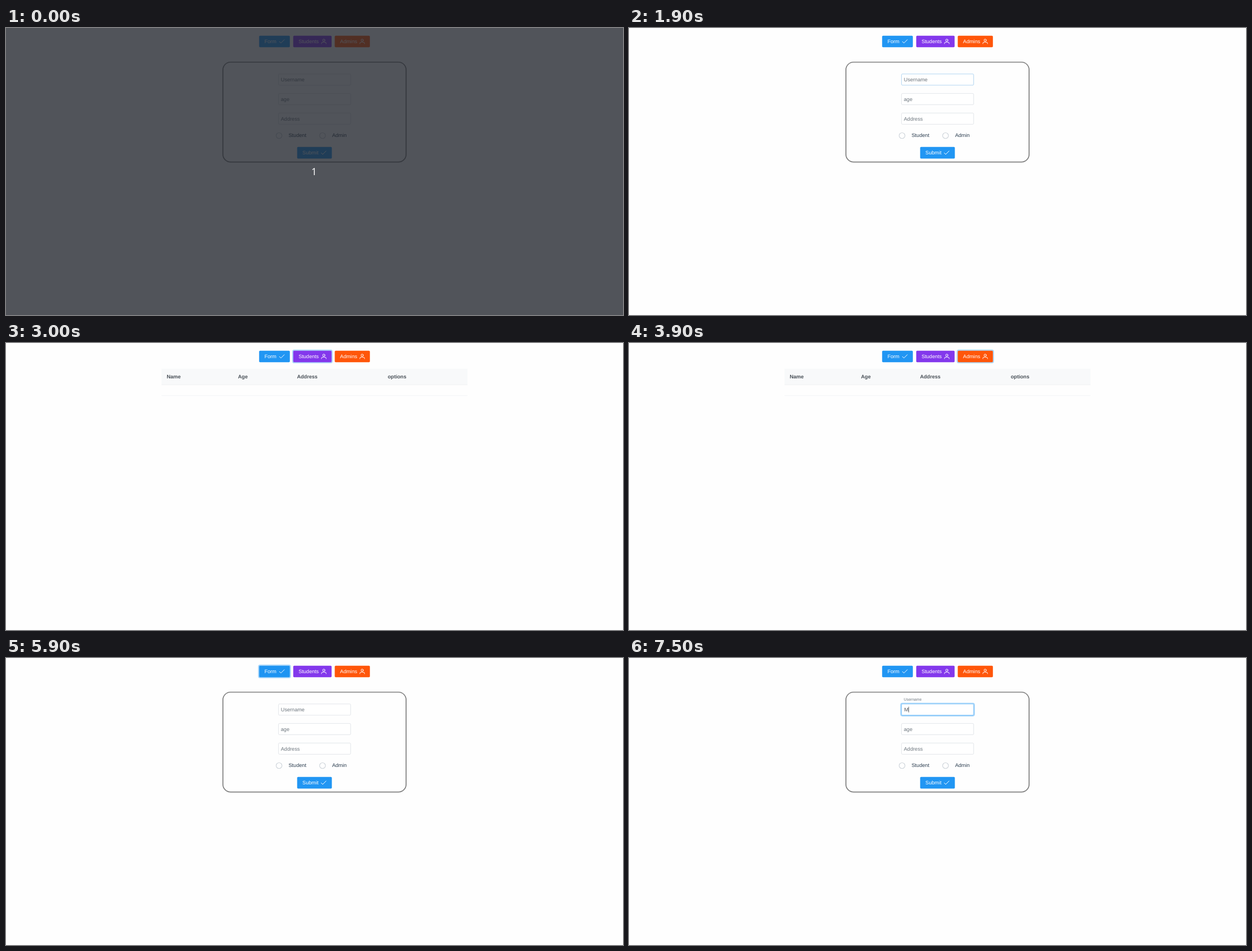
These frames come from a looping animation (1095 by 511 pixels, 8000 ms). An HTML page:

```html
<!DOCTYPE html>
<html lang="en">
<head>
<meta charset="utf-8">
<title>Student form</title>
<style>
  html, body { margin: 0; width: 100%; height: 100%; overflow: hidden; background: #fefefe; }
  svg { display: block; width: 1095px; height: 511px; }
  text { font: 16px "Liberation Sans", Arial, sans-serif; fill: #2c3e50; text-rendering: geometricPrecision; }
  .on-button { fill: #fff; }
  .icon { fill: none; stroke: #fff; stroke-width: 1.7; stroke-linecap: round; stroke-linejoin: round; }
  .ring { fill: none; stroke: #a6d5fa; }
  .input { fill: #fff; stroke: #ced4da; }
  .radio { fill: #fff; stroke: #ced4da; stroke-width: 2; }
  .hint { fill: #6c757d; }
  .head { font-weight: bold; fill: #495057; }
  #typed { fill: #495057; }
  #countdown text { font: 31px "Open Sans", "Noto Sans", sans-serif; fill: #fff; text-anchor: middle; }
</style>
</head>
<body>
<svg id="stage" viewBox="0 0 1920 896" preserveAspectRatio="none">
  <defs>
    <path id="check" class="icon" d="M1 8.5 L5.5 13 L16 2.5"/>
    <g id="user" class="icon">
      <circle cx="8" cy="4.2" r="3.5"/>
      <path d="M.8 15.2 V14 a3.8 3.8 0 0 1 3.8 -3.8 h6.8 a3.8 3.8 0 0 1 3.8 3.8 V15.2"/>
    </g>
  </defs>
  <g id="nav"></g>
  <g id="form">
    <rect x="675" y="106.5" width="570" height="312" rx="24" fill="none" stroke="#808080" stroke-width="3"/>
  </g>
  <g id="table">
    <rect x="484" y="80" width="952" height="50" fill="#f8f9fa"/>
    <path d="M484 130.5 H1436 M484 164.3 H1436" stroke="#e9ecef"/>
  </g>
  <g id="countdown">
    <rect width="1920" height="896" fill="rgb(33 36 44)" opacity=".78"/>
    <text x="959" y="459">1</text>
  </g>
</svg>
<script>
const LOOP = 8000, STEP = 100;
const $ = id => document.getElementById(id);

function add(parent, tag, attrs, content = '') {
  const el = document.createElementNS('http://www.w3.org/2000/svg', tag);
  for (const name in attrs) el.setAttribute(name, attrs[name]);
  el.textContent = content;
  return parent.appendChild(el);
}

const label = (parent, x, y, content, cls = '') => add(parent, 'text', { x, y, class: cls }, content);

function button(parent, x, y, width, color, name, icon, iconX) {
  const ring = add(parent, 'rect', { class: 'ring' });
  const face = add(parent, 'rect', { x, y, width, height: 36, rx: 3, fill: color });
  label(parent, x + 16.5, y + 23.5, name, 'on-button');
  add(parent, 'use', { href: '#' + icon, x: iconX, y: y + 10 });
  return { face, ring, x, y, width };
}

function input(y, hint) {
  const x = 847.5, width = 225.5;
  const ring = add($('form'), 'rect', { class: 'ring' });
  const face = add($('form'), 'rect', { x: x + .5, y: y + .5, width: width - 1, height: 35, rx: 3, class: 'input' });
  return { face, ring, x, y, width, hint: label($('form'), 855.3, y + 23.5, hint, 'hint') };
}

function setRing({ ring, x, y, width }, amount) {
  const spread = 3.2 * amount, half = spread / 2;
  const attrs = { x: x - half, y: y - half, width: width + spread, height: 36 + spread,
    rx: 3 + half, 'stroke-width': spread, opacity: amount };
  for (const name in attrs) ring.setAttribute(name, attrs[name]);
}

const formButton = button($('nav'), 787.7, 24, 95.6, '#2196f3', 'Form', 'check', 850);
const studentsButton = button($('nav'), 893.8, 24, 119.4, '#8338ec', 'Students', 'user', 981);
const adminsButton = button($('nav'), 1023, 24, 109.4, '#fb5607', 'Admins', 'user', 1100.4);
adminsButton.face.setAttribute('fill', '#ff560a');

const username = input(143, 'Username');
input(204, 'age');
input(265, 'Address');
for (const [x, name] of [[849.7, 'Student'], [985, 'Admin']]) {
  add($('form'), 'circle', { cx: x, cy: 336, r: 9, class: 'radio' });
  label($('form'), x + 29.6, 340.5, name);
}
button($('form'), 906, 371.5, 108, '#2196f3', 'Submit', 'check', 980);
const typed = label($('form'), 856.5, 166.5, 'M');
typed.id = 'typed';
const caret = add($('form'), 'rect', { y: 152, width: 1.4, height: 18, fill: '#495057' });

for (const [x, name] of [[500, 'Name'], [722, 'Age'], [905.5, 'Address'], [1188, 'options']])
  label($('table'), x, 110, name, 'head');

// Value of the latest [time, value] pair reached; 0 before the first.
const at = (t, ...keys) => keys.reduce((value, [time, next]) => t >= time ? next : value, 0);
const mix = (from, to, amount) => `color-mix(in srgb, ${to} ${amount * 100}%, ${from})`;
const show = (el, visible) => el.style.display = visible ? '' : 'none';

function draw(t) {
  const tableOpen = t >= 2900 && t < 5400;
  show($('countdown'), t < 100);
  show($('table'), tableOpen);
  show($('form'), !tableOpen);

  setRing(studentsButton, at(t, [2800, .1], [2900, .7], [3000, 1], [3700, .6], [3800, .1], [3900, 0]));
  setRing(adminsButton, at(t, [3700, .4], [3800, .9], [3900, 1], [5300, 0]));
  setRing(formButton, at(t, [5300, .5], [5400, .9], [5500, 1], [6400, .6], [6500, .1], [6600, 0]));

  const hover = at(t, [4800, .4], [4900, .9], [5000, 1], [5800, .6], [5900, .15], [6000, 0]);
  const press = at(t, [5300, .9], [5400, .7], [5500, .2], [5600, 0]);
  formButton.face.style.fill = mix(mix('#2196f3', '#0d89ec', hover), '#0b7ad1', press);

  const focus = at(t, [6400, .4], [6500, .9], [6600, 1]);
  const border = at(t, [1900, .5], [2000, .6], [2100, 0], [6000, .5], [6100, 1]);
  username.face.style.stroke = mix('#ced4da', '#2196f3', border);
  setRing(username, focus);
  username.hint.setAttribute('y', 166.5 - 33.7 * focus);
  username.hint.style.fontSize = 16 - 4 * focus + 'px';

  const hasText = t >= 7500;
  show(typed, hasText);
  show(caret, t >= 6500 && (t < 7000 || hasText));
  caret.setAttribute('x', hasText ? 869.6 : 856.5);
}

function tick() {
  const t = performance.now() % LOOP;
  draw(Math.floor(t / STEP) * STEP);
  requestAnimationFrame(tick);
}
tick();
</script>
</body>
</html>
```
